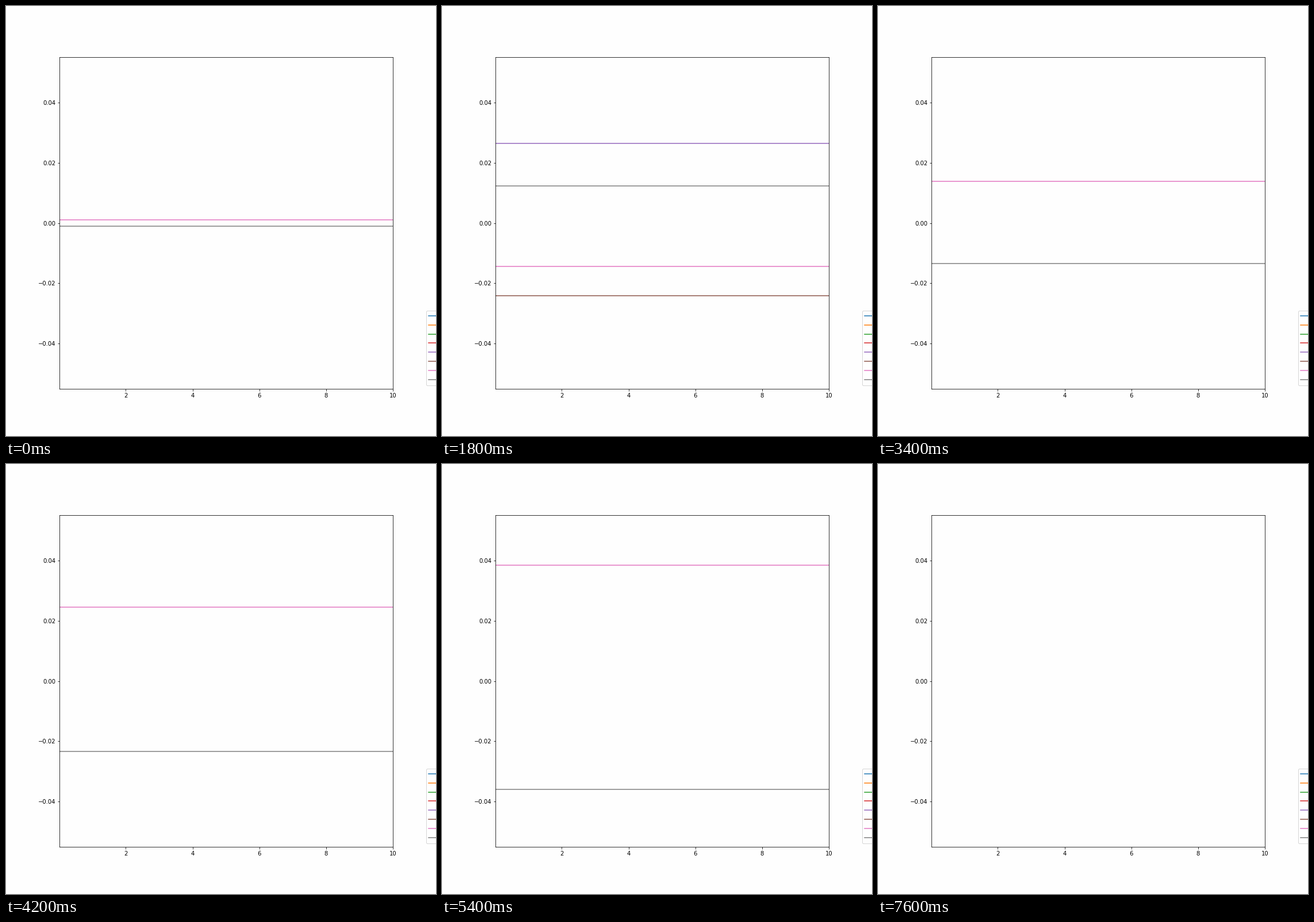
Recreate the animation shown at these times as a matplotlib script. Size 748 by 748 pixels, loop 8 s.

```python
import matplotlib.pyplot as plt
from matplotlib.animation import FuncAnimation
from matplotlib.lines import Line2D
from matplotlib.patches import FancyBboxPatch

SIZE, DPI = 748, 72
FRAMES, INTERVAL = 40, 200
LAST = 38
X_MIN, X_MAX, Y_MAX = 0.02, 10, 0.055
LEFT, RIGHT, TOP, BOTTOM = 93.2, 673.2, 89.3, 665.8

plt.rcParams["font.family"] = "DejaVu Sans"
fig = plt.figure(figsize=(SIZE / DPI, SIZE / DPI), dpi=DPI, facecolor="#fefefe")
ax = fig.add_axes([LEFT / SIZE, 1 - BOTTOM / SIZE,
                   (RIGHT - LEFT) / SIZE, (BOTTOM - TOP) / SIZE],
                  facecolor="#fefefe")
ax.set_xlim(X_MIN, X_MAX)
ax.set_ylim(-Y_MAX, Y_MAX)


def growth(step, power):
    """Power-law growth, equal to 1 at step 5."""
    return ((step - 0.5) / 4.5) ** power


def level(i, step):
    """Height of line i: even lines rise, odd lines fall, in four ranks."""
    rank = 3 - i // 2
    rising = i % 2 == 0
    if step == 0:
        rest = 0.00115 if rising else -0.00095
        return rest if rank == 0 else float("nan")
    if rising:
        return -0.1153 + (0.0798 + 0.0322 * rank) * growth(step, 0.370)
    return 0.1035 - (0.0719 + 0.02865 * rank) * growth(step, 0.374)


def add_legend():
    """Legend box running off the right edge, placed in pixels from the top."""
    box = FancyBboxPatch((731.4, SIZE - 660.2), 90, 129.8,
                         boxstyle="round,pad=0,rounding_size=2",
                         fc="white", ec="0.8", lw=1, alpha=0.8,
                         transform=None, snap=True)
    fig.add_artist(box)
    for i in range(8):
        y = SIZE - (539.1 + 15.78 * i)
        fig.add_artist(Line2D([735.4, 756], [y, y], color=f"C{i}", lw=1.5,
                              transform=None))


lines = [ax.plot([X_MIN, X_MAX], [0, 0], color=f"C{i}", lw=1.5)[0]
         for i in range(8)]
add_legend()


def update(frame):
    step = min(frame, LAST)
    for i, line in enumerate(lines):
        line.set_ydata([level(i, step)] * 2)
    return lines


anim = FuncAnimation(fig, update, frames=FRAMES, interval=INTERVAL,
                     init_func=lambda: update(0), repeat=True,
                     repeat_delay=0, blit=False)
plt.show()
```
